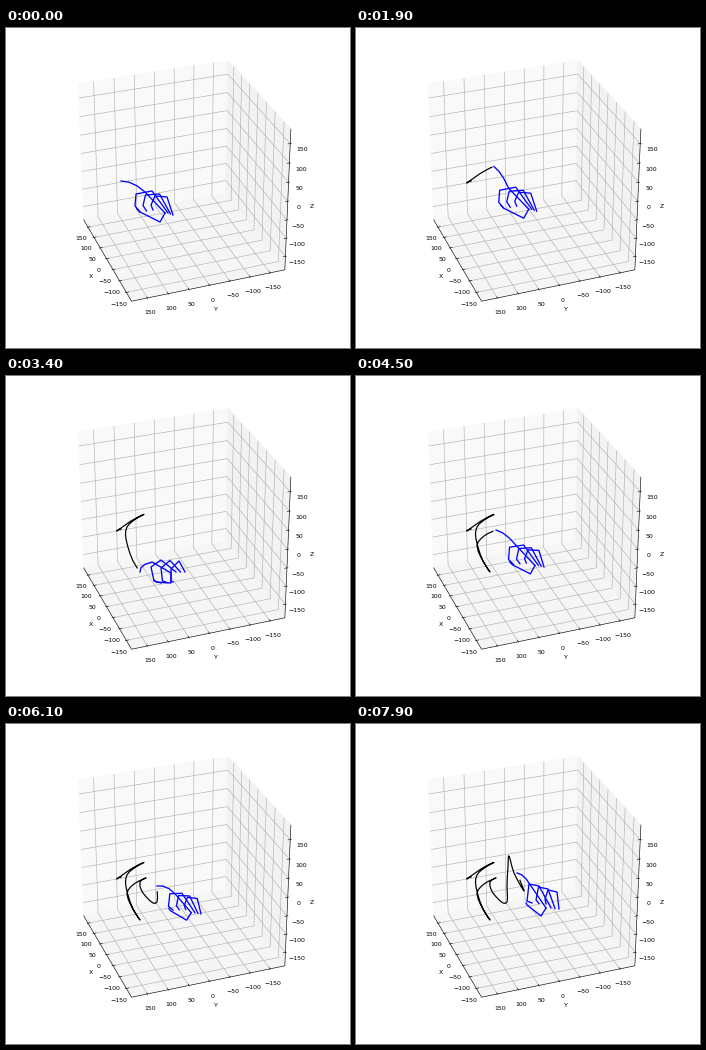
Animation of 344 by 320 pixels, one loop 8 s. Source, as a matplotlib script:

```python
import numpy as np
import matplotlib.pyplot as plt
from matplotlib.animation import FuncAnimation

W, H, DPI = 344, 320, 100
PX = 72 / DPI
FRAMES, INTERVAL = 80, 100
FONT = 6.3 * PX

plt.rcParams.update({"path.snap": False, "font.family": "DejaVu Sans"})
fig = plt.figure(figsize=(W / DPI, H / DPI), dpi=DPI, facecolor="white")
ax = fig.add_axes([0, 0, 1, 1])
ax.set(xlim=(0, W), ylim=(H, 0))
ax.axis("off")

# --- perspective box -------------------------------------------------------
ELEV, TURN = np.radians(30), np.radians(20)
SE, CE, ST, CT = np.sin(ELEV), np.cos(ELEV), np.sin(TURN), np.cos(TURN)
L = 187.5
HALF = 0.55


def project(points):
    """Data coordinates to stage pixels."""
    x, y, z = np.asarray(points, float).T * HALF / L
    right = -ST * x - CT * y
    up = SE * (CT * x - ST * y) + CE * z
    depth = 10 - (CE * (ST * y - CT * x) + SE * z)
    return 175.4 + 1466 * right / depth, 148.7 - 1452 * up / depth


def line3d(points, color, width, z):
    ax.plot(*project(points), color=color, lw=width * PX, zorder=z,
            solid_capstyle="butt", solid_joinstyle="round")


def pane(points, shade):
    ax.fill(*project(points), color=str(shade), lw=0.4 * PX, zorder=0)


def label(x, y, text):
    ax.text(x, y, text, fontsize=FONT, ha="center", va="center")


def tick_label(point, text):
    x, y = project([point])
    label(x[0], y[0] + 3.5, text)


pane([(L, L, -L), (L, -L, -L), (L, -L, L), (L, L, L)], 0.975)
pane([(L, -L, -L), (-L, -L, -L), (-L, -L, L), (L, -L, L)], 0.95)
pane([(L, L, -L), (L, -L, -L), (-L, -L, -L), (-L, L, -L)], 0.9625)

IN, OUT, FAR = L * 0.967, L * 1.017, L * 1.102
for v in range(-150, 151, 50):
    name = str(v).replace("-", "\u2212")
    for path in ([(v, L, -L), (v, -L, -L), (v, -L, L)],
                 [(-L, v, -L), (L, v, -L), (L, v, L)],
                 [(L, L, v), (L, -L, v), (-L, -L, v)]):
        line3d(path, "#b0b0b0", 0.6, 1)
    for tick in ([(v, IN, -L), (v, OUT, -L)],
                 [(-IN, v, -L), (-OUT, v, -L)],
                 [(-L, -IN, v), (-L, -OUT, v)]):
        line3d(tick, "black", 0.55, 2)
    tick_label((v, FAR, -FAR), name)
    tick_label((-FAR, v, -FAR), name)
    tick_label((-FAR, -FAR, v), name)

line3d([(L, L, -L), (-L, L, -L), (-L, -L, -L), (-L, -L, L)], "black", 0.6, 2)
label(84.5, 248.5, "X")
label(210, 281.5, "Y")
label(306, 178.5, "Z")


# --- hand poses, relative to the wrist -------------------------------------
def pose(index, middle, little, thumb):
    return np.array(index + middle + little + thumb, float)


OPEN = pose([(-8, -2), (-28, -23)],
            [(-5, -2), (-21, -24), (-37, -21), (-38, -9), (-33, -3)],
            [(-6, -18), (-18, -19), (-22, -10), (-20, -5)],
            [(-13, 7), (-33, -3), (-36, -6)])
DIPPED = pose([(-14, 1), (-33, -10)],
              [(-9, 0), (-24, -12), (-34, -5), (-31, 9), (-24, 11)],
              [(-6, -11), (-14, -3), (-14, 9), (-12, 10)],
              [(-14, 11), (-29, 10), (-31, 8)])
RAISED = pose([(-13, -1), (-28, -23)],
              [(-8, -1), (-20, -23), (-30, -25), (-32, -8), (-27, -6)],
              [(-2, -17), (-11, -19), (-14, -10), (-13, -5)],
              [(-18, 7), (-32, -4), (-33, -6)])
NARROW = (OPEN + RAISED) / 2 * (0.93, 0.88)


def smooth_path(keys):
    """Hermite curve through rows of (step, x, y)."""
    keys = np.array(keys, float)
    steps, points = keys[:, 0], keys[:, 1:]
    slopes = np.gradient(points, steps, axis=0)

    def at(n):
        i = min(np.searchsorted(steps, n, side="right") - 1, len(steps) - 2)
        span = steps[i + 1] - steps[i]
        s = (n - steps[i]) / span
        a = s * s * (3 - 2 * s)
        bend = (1 - s) * slopes[i] - s * slopes[i + 1]
        return points[i] * (1 - a) + points[i + 1] * a + span * s * (1 - s) * bend
    return at


tip_at = smooth_path([
    (6, 115, 153), (9, 112.5, 153.7), (12, 111.5, 154.5), (15, 125, 145),
    (20, 138, 138.5), (23, 129, 143.5), (26, 121, 151), (29, 120, 163),
    (32, 127, 185), (34, 134, 196), (36, 128, 187), (39, 121, 170),
    (42, 128, 160), (45, 140, 154), (49, 134, 158), (53, 137, 169),
    (56, 147, 179), (58, 151, 178), (61, 151, 162), (65, 152, 143),
    (70, 153.5, 133), (73, 158, 149), (76, 168, 167), (79, 161, 149)])
wrist_at = smooth_path([
    (6, 167, 187), (12, 166, 187), (15, 175, 186), (20, 181, 183),
    (26, 173, 188), (34, 179, 196), (39, 182, 194), (45, 188, 191),
    (49, 186, 192), (58, 194, 194), (61, 195, 190), (70, 199, 181),
    (76, 203, 188), (79, 203, 185)])


def moving_step(n):
    """The hand rests at first and pauses for one step."""
    return max(6, 15 if n == 16 else n)


def hand(n):
    n = moving_step(n)
    tip, wrist = tip_at(n), wrist_at(n)
    dip = np.interp(n, [26, 34, 42, 49, 55, 58, 61, 72, 76, 79],
                    [0, 1, .1, 0, .5, .4, 0, 0, .4, 0])
    narrow = np.interp(n, [36, 45, 61, 70], [0, .4, 1, 0])
    raised = np.interp(n, [61, 70, 79], [0, .4, 1])
    joints = wrist + (OPEN + dip * (DIPPED - OPEN) + narrow * (NARROW - OPEN)
                      + raised * (RAISED - OPEN))
    base, knuckle = joints[:2]
    s = np.array([[0], [1 / 3], [2 / 3], [1]])
    arch = np.array([-3 * dip, -2.5 + 1.5 * dip])
    finger = knuckle + s * (tip - knuckle) + 4.5 * s * (1 - s) * arch
    index = np.vstack([base, finger])
    middle = joints[2:7]
    little = np.vstack([wrist, joints[7:11]])
    thumb = np.vstack([base, joints[11:]])
    return index, middle, (middle + little) / 2, little, thumb


TRAIL = np.array([tip_at(moving_step(n)) for n in range(FRAMES)])
trail, = ax.plot([], [], color="black", lw=1.2 * PX, zorder=4)
fingers = [ax.plot([], [], color="blue", lw=1.3 * PX, zorder=5)[0]
           for _ in range(5)]


def update(n):
    trail.set_data(*TRAIL[6:max(n, 6)].T)
    for line, points in zip(fingers, hand(n)):
        line.set_data(*points.T)
    return [trail, *fingers]


anim = FuncAnimation(fig, update, frames=FRAMES, interval=INTERVAL,
                     init_func=lambda: update(0), repeat=True, repeat_delay=0)
plt.show()
```
